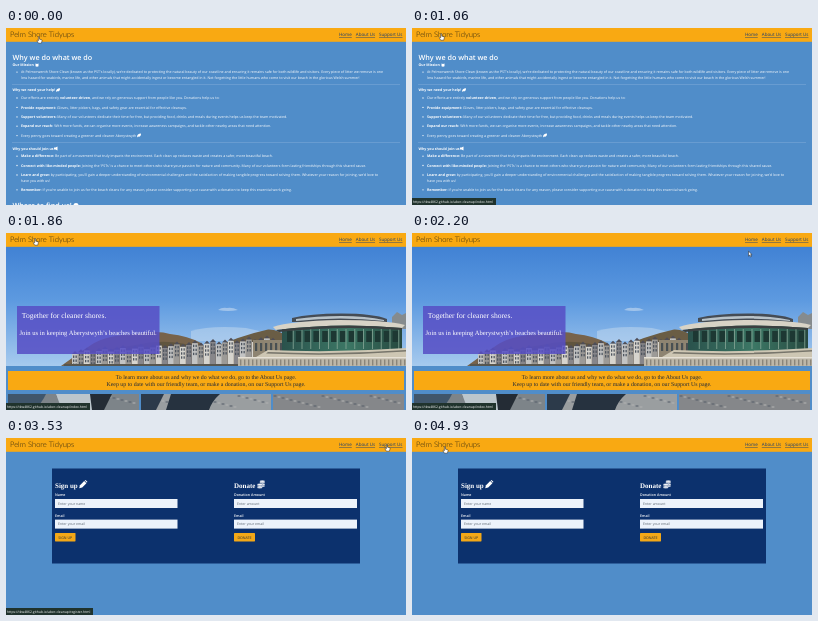
Animation of 400 by 177 pixels, one loop 5000 ms. Source, as an HTML page:

```html
<!DOCTYPE html>
<html lang="en">
<head>
<meta charset="utf-8">
<title>Beach tidying website tour</title>
<style>
  html, body { margin: 0; width: 100%; height: 100%; overflow: hidden; background: #508dc9; }
  svg { display: block; width: 100vw; height: 100vh; }
  text { font-family: "Open Sans", "Noto Sans", sans-serif; text-rendering: geometricPrecision; fill: #fff; }
  .serif { font-family: "Liberation Serif", serif; }
  .logo { font-family: Lato, sans-serif; font-weight: 300; fill: #2b2412; }
  .nav { fill: #173c74; text-decoration: underline; }
  .dark { fill: #222a38; }
  .hint { fill: #5b6570; }
  .bold { font-weight: 700; }
  .semi { font-weight: 600; }
  .mid { text-anchor: middle; }
</style>
</head>
<body>
<svg viewBox="0 0 400 177" preserveAspectRatio="none">
  <defs>
    <linearGradient id="sky" x2="0" y2="1">
      <stop offset="0" stop-color="#4182d4"/>
      <stop offset=".45" stop-color="#5d9ae0"/>
      <stop offset="1" stop-color="#a6caee"/>
    </linearGradient>
    <linearGradient id="drum">
      <stop offset="0" stop-color="#2a524c"/>
      <stop offset=".55" stop-color="#3c7765"/>
      <stop offset="1" stop-color="#26483f"/>
    </linearGradient>
    <path id="leaf" d="M-2 1.7Q-2-1.6 2-1.8Q2.2 1.8-1 1.2L-2 2Z" fill="#fff"/>
  </defs>
  <rect width="400" height="177" fill="#508dc9"/>
  <g id="about"></g>
  <g id="home"></g>
  <g id="support"></g>
  <g id="header"></g>
  <g id="status"><rect id="statusBox" y="170" height="7" fill="#20332d"/></g>
  <g id="cursor" stroke="#1c1c1c" stroke-width=".5" stroke-linejoin="round" fill="#fff">
    <path id="hand" d="M-1.1-3.2Q-.4-3.8 0-3.1V-.8L2.1-.3Q2.7 0 2.5 1L1.9 3.2H-1.1L-2.6.7Q-2.4-.1-1.1.7Z"/>
    <path id="arrow" d="M-1.5-2.8V2.1L-.3 1L.5 2.9L1.4 2.5L.6.7H2.1Z"/>
  </g>
</svg>
<script>
const LOOP = 5000;
const $ = id => document.getElementById(id);
const text = (x, y, size, content, cls = '') =>
  `<text x="${x}" y="${y}" font-size="${size}" class="${cls}">${content}</text>`;
const rect = (x, y, w, h, fill, extra = '') =>
  `<rect x="${x}" y="${y}" width="${w}" height="${h}" fill="${fill}" ${extra}/>`;
const path = (d, fill, extra = '') => `<path d="${d}" fill="${fill}" ${extra}/>`;
const repeat = (n, make) => Array.from({ length: n }, (_, i) => make(i)).join('');
const leaf = (x, y) => `<use href="#leaf" x="${x}" y="${y}"/>`;

function header() {
  return rect(0, 0, 400, 13.8, '#f9a912')
    + text(4, 9.4, 7.6, 'Pelm Shore Tidyups', 'logo')
    + text(333, 8.4, 4.5, 'Home', 'nav')
    + text(349.8, 8.4, 4.5, 'About Us', 'nav')
    + text(373, 8.4, 4.5, 'Support Us', 'nav');
}

function aboutPage() {
  const size = 3.59;
  const line = (y, content) => text(15, y, size, content);
  const item = (y, lead, content) =>
    `<circle cx="11" cy="${y - 1.2}" r=".65" fill="#fff"/>`
    + line(y, (lead ? `<tspan class="bold">${lead}</tspan> ` : '') + content);
  const title = (y, content) => text(6.5, y, size, content, 'bold');
  const rule = y => rect(6, y, 388, .4, '#8db4dc');
  return text(6.5, 31.5, 7.2, 'Why we do what we do', 'semi')
    + title(38.4, 'Our Mission')
    + path('M29.5 35.5L31 36L32.5 35.5V38.2L31 38.7L29.5 38.2Z', '#fff')
    + item(45.3, '', "At Pelmorwenth Shore Clean (known as the PST's locally), we're dedicated to protecting the natural beauty of our coastline and ensuring it remains safe for both wildlife and visitors. Every piece of litter we remove is one")
    + line(50.6, 'less hazard for seabirds, marine life, and other animals that might accidentally ingest or become entangled in it. Not forgetting the little humans who come to visit our beach in the glorious Welsh summer!')
    + rule(56)
    + title(63.4, 'Why we need your help!') + leaf(52, 62)
    + item(71.2, '', 'Our efforts are entirely <tspan class="bold">volunteer-driven</tspan>, and we rely on generous support from people like you. Donations help us to:')
    + item(80.6, 'Provide equipment:', 'Gloves, litter pickers, bags, and safety gear are essential for effective cleanups.')
    + item(90.1, 'Support volunteers:', 'Many of our volunteers dedicate their time for free, but providing food, drinks and meals during events helps us keep the team motivated.')
    + item(99.4, 'Expand our reach:', 'With more funds, we can organise more events, increase awareness campaigns, and tackle other nearby areas that need attention.')
    + item(108.8, '', 'Every penny goes toward creating a greener and cleaner Aberystwyth') + leaf(133, 107.4)
    + rule(114)
    + title(121.8, 'Why you should join us')
    + path('M48 119.5H49.5L51.5 118.5V122.5L49.5 121.5H48Z', '#fff')
    + item(129.4, 'Make a difference:', 'Be part of a movement that truly impacts the environment. Each clean up reduces waste and creates a safer, more beautiful beach.')
    + item(138.7, 'Connect with like-minded people:', "Joining the 'PSTs' is a chance to meet others who share your passion for nature and community. Many of our volunteers form lasting friendships through this shared cause.")
    + item(148.2, 'Learn and grow:', "by participating, you'll gain a deeper understanding of environmental challenges and the satisfaction of making tangible progress toward solving them. Whatever your reason for joining, we'd love to")
    + line(153.5, 'have you with us!')
    + item(163, 'Remember:', "If you're unable to join us for the beach cleans for any reason, please consider supporting our cause with a donation to keep this essential work going.")
    + text(6.5, 180, 7.2, 'Where to find us!', 'semi')
    + '<circle cx="70" cy="177.5" r="2.6" fill="#fff"/>';
}

function terrace() {
  const walls = ['#c3c4c4', '#9c9a97', '#d6d4ce', '#87868a'];
  return repeat(34, i => {
    const x = 66 + i * 6, top = 121 - i * .4 - (i % 3) * 1.4;
    return path(`M${x} ${top}l3-3l3 3Z`, '#4f4e57')
      + rect(x, top, 5.8, 132 - top, walls[i % 4])
      + repeat(6, k => rect(x + 1 + (k % 2) * 2.5, top + 1.5 + (k >> 1) * 4, 1.3, 2.4, '#4e555f'));
  });
}

function pavilion() {
  const panes = repeat(13, i => rect(281 + i * 8.8, 98, 5.6, 11, '#1d3833') + rect(286.8 + i * 8.8, 96, .8, 20, '#87a797'));
  const posts = repeat(42, i => rect(234 + i * 4, 126.5, 1.4, 6, '#8a857a'));
  return path('M386 92V84L391 79L396 82L400 80V96H386Z', '#858b8e')
    + rect(247, 107, 32, 18, '#8e8471')
    + repeat(6, i => rect(249 + i * 5, 110, 2.2, 8, '#484f52'))
    + path('M276 94Q335 88 396 92V117Q335 121 276 118Z', 'url(#drum)') + panes
    + path('M286 89V85Q304 80.5 335 80.5Q368 80.5 381 86V90Z', '#454c55')
    + path('M290 86Q310 83 335 83T378 87V88Q335 83 290 88Z', '#b9c3c9')
    + path('M267 94Q284 88 333 87Q380 87 399 92L396 95Q335 89 270 97Z', '#d8d3c6')
    + path('M270 97Q335 89 396 95V97Q335 92 273 99Z', '#3a3f40')
    + path('M262 117Q330 120 400 115V124H250Z', '#cdc6b3')
    + path('M262 119Q330 122 400 117V118.5Q330 123.5 260 120.5Z', '#77756b')
    + rect(232, 124, 168, 9, '#bdb7a8') + posts
    + rect(232, 124, 168, 1.4, '#e6e1d6');
}

function seafront() {
  return rect(0, 14, 400, 119, 'url(#sky)')
    + path('M212 77Q216 74 221 75Q226 74 232 77Q222 79 212 77Z', '#cfe0f2', 'opacity=".55"')
    + path('M185 98Q205 92 240 95L262 100L220 108H185Z', '#d5e3f0', 'opacity=".4"')
    + path('M55 133Q70 122 85 112T130 101Q152 97 164 101Q182 103 195 110L215 133Z', '#77634b')
    + path('M60 133Q90 117 130 112Q165 104 195 116V133Z', '#57513b', 'opacity=".7"')
    + path('M200 118Q232 103 262 96.5Q272 96 282 104V133H200Z', '#6a5d45')
    + terrace()
    + rect(58, 131, 180, 2, '#57564f')
    + pavilion();
}

function pebbles(x, w, color) {
  return rect(x, 161, w, 16, color) + repeat(Math.floor(w / 4), i =>
    `<ellipse cx="${x + 2 + i * 4}" cy="${163 + i * 37 % 12}" rx="1.7" ry="1" fill="${i % 2 ? '#b0b2b2' : '#59616a'}" opacity=".6"/>`);
}

function homePage() {
  return seafront()
    + rect(11, 73, 142.5, 48, '#574fc5', 'opacity=".86"')
    + text(15.8, 85, 7.58, 'Together for cleaner shores.', 'serif')
    + text(13.5, 102.3, 6.62, 'Join us in keeping Aberystwyth’s beaches beautiful.', 'serif')
    + rect(0, 133, 400, 44, '#508dc9')
    + rect(2, 138, 396, 19, '#f9a912')
    + text(200, 145.6, 5.86, 'To learn more about us and why we do what we do, go to the About Us page.', 'serif dark mid')
    + text(200, 152.8, 5.86, 'Keep up to date with our friendly team, or make a donation, on our Support Us page.', 'serif dark mid')
    + pebbles(2, 131, '#7d8489')
    + path('M2 161H40Q36 170 28 177H2Z', '#40566b')
    + path('M50 161H84Q90 170 86 177H56Z', '#bcc6cc')
    + path('M84 161H106L98 177H86Z', '#242c35')
    + pebbles(135, 130, '#9a9ea0')
    + path('M135 161H158L150 177H135Z', '#2c3a4a')
    + path('M165 161H214Q206 168 203 177H160Z', '#26323f')
    + pebbles(267, 131, '#85878a');
}

function supportPage() {
  const field = (x, y, w, label, hint) => text(x, y, 3.6, label, 'semi')
    + rect(x, y + 3, w, 9, '#edf3fb') + text(x + 3, y + 8.8, 3.5, hint, 'hint');
  const form = (x, w, title, label, hint, button, buttonWidth) =>
    text(x, 49.6, 7, title, 'serif bold')
    + field(x, 58, w, label, hint)
    + field(x, 78.6, w, 'Email', 'Enter your email')
    + rect(x, 95, buttonWidth, 8.4, '#f3a817', 'rx=".6"')
    + text(x + buttonWidth / 2, 100.6, 3.6, button, 'dark mid');
  const coin = (x, y) => `<ellipse cx="${x}" cy="${y}" rx="2.7" ry="1" fill="#fff" stroke="#0c316d" stroke-width=".3"/>`;
  return rect(46, 30.5, 308, 95, '#0c316d')
    + form(49, 122.5, 'Sign up', 'Name', 'Enter your name', 'SIGN UP', 20.5)
    + form(228, 123, 'Donate', 'Donation Amount', 'Enter amount', 'DONATE', 21)
    + path('M73.2 50.2L74 47.2L78.2 43L80.4 45.2L76.2 49.4Z', '#fff')
    + path('M78.7 42.5L79.5 41.9L81.4 43.8L80.9 44.7Z', '#fff')
    + repeat(4, i => coin(256.3, 48 - i * 1.6))
    + repeat(3, i => coin(253.8, 49.6 - i * 1.6));
}

$('about').innerHTML = aboutPage();
$('home').innerHTML = homePage();
$('support').innerHTML = supportPage();
$('header').innerHTML = header();
$('status').innerHTML += text(1, 174.9, 3.4, '');
const statusText = $('status').querySelector('text');

// Cursor stops: time, x, y
const stops = [
  [0, 33.5, 12], [60, 33.5, 12], [400, 29.8, 9], [1900, 29.8, 9],
  [2200, 338, 21], [2460, 338, 21], [2800, 382.5, 9], [3400, 382.5, 9],
  [3530, 381.5, 10], [3870, 381.5, 10], [4060, 33.5, 12], [LOOP, 33.5, 12]
];
const clamp = v => Math.min(1, Math.max(0, v));

function cursorAt(t) {
  const i = stops.findIndex(s => s[0] > t);
  const [t0, x0, y0] = stops[i - 1], [t1, x1, y1] = stops[i];
  const p = (t - t0) / (t1 - t0), e = p * p * (3 - 2 * p);
  return [x0 + (x1 - x0) * e, y0 + (y1 - y0) * e];
}

function show(id, visible) {
  $(id).style.display = visible ? '' : 'none';
}

function render(t) {
  const page = t < 1400 ? 'about' : t < 3260 ? 'home' : 'support';
  for (const id of ['about', 'home', 'support']) show(id, id === page);

  const onSupport = t >= 2700;
  statusText.textContent = `https://tkw4862.github.io/aber-cleanup/${onSupport ? 'register' : 'index'}.html`;
  $('statusBox').setAttribute('width', onSupport ? 87 : 84);
  $('status').style.opacity = t < 300 ? 0 : 1 - clamp((t - 4280) / 380);

  const [x, y] = cursorAt(t);
  const onLink = y < 14 && (x < 69 || x > 332);
  $('cursor').setAttribute('transform', `translate(${x} ${y})`);
  show('hand', onLink);
  show('arrow', !onLink);
}

function tick() {
  render(performance.now() % LOOP);
  requestAnimationFrame(tick);
}
tick();
</script>
</body>
</html>
```
